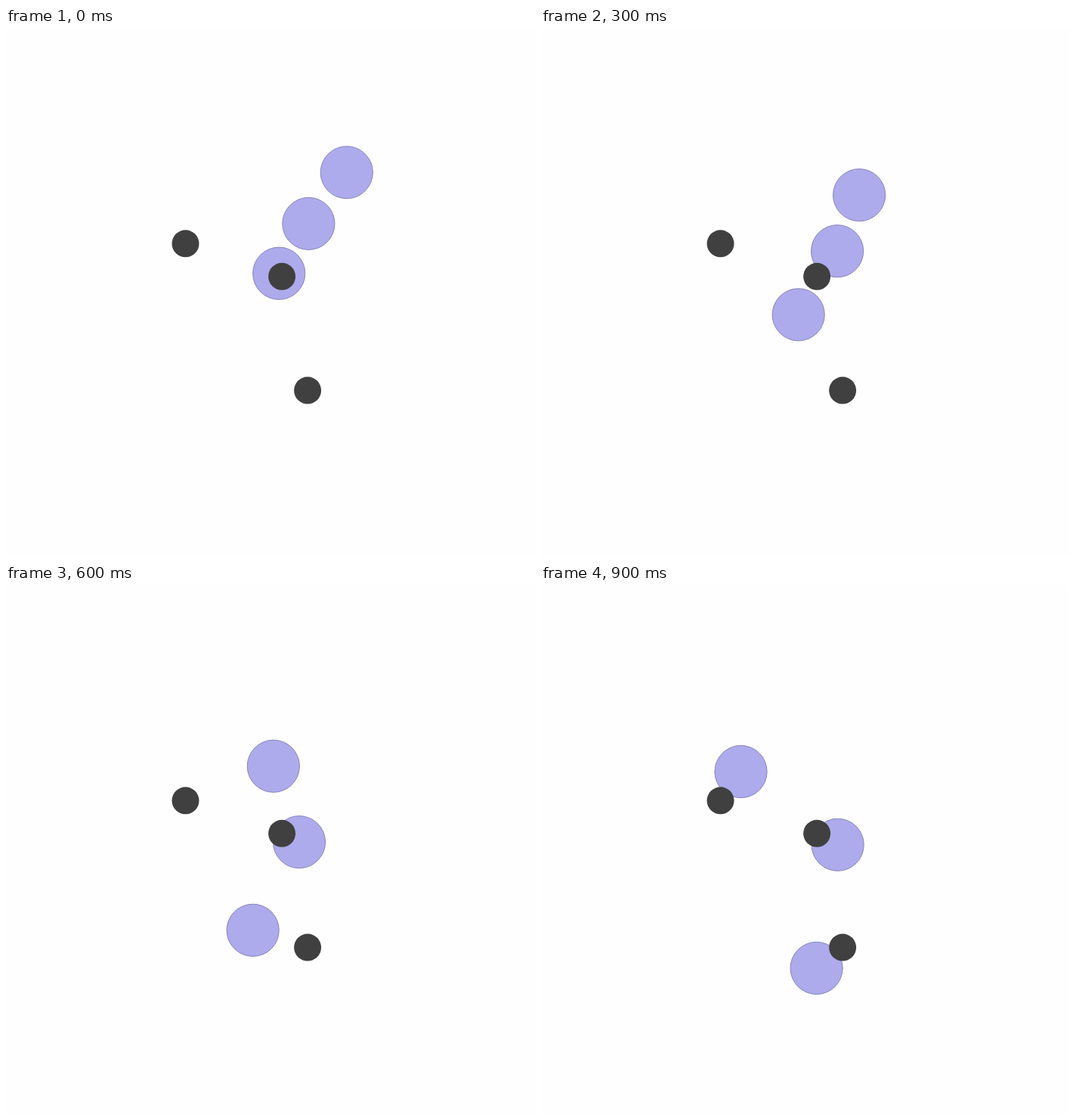
These frames come from a looping animation (700 by 700 pixels, 1 s). An HTML page without scripts:

```html
<!DOCTYPE html>
<html lang="en">
<head>
<meta charset="utf-8">
<title>Bouncing balls</title>
<style>
  @property --t { syntax: "<number>"; inherits: true; initial-value: 0; }

  html, body { margin: 0; width: 100%; height: 100%; overflow: hidden; background: #fefefe; }

  /* --t counts ten held steps per loop */
  svg { display: block; width: 100%; height: 100%; animation: tick 1s steps(10) infinite; }
  @keyframes tick { from { --t: 0; } to { --t: 10; } }

  .peg { fill: #404040; }
  .ball {
    fill: #adabeb;
    stroke: #8785bc;
    translate: calc(var(--x) * 1px) calc(var(--y) * 1px);
  }

  /* Sweeps left while its fall slows */
  .sweep {
    --x: (450.8 - var(--t) * (3.207 + var(--t) * (2.157 + var(--t) * (.0483 - var(--t) * .008))));
    --y: (191.1 + var(--t) * (9.554 + var(--t) * (.773 - var(--t) * (.2532 - var(--t) * .014))));
  }

  /* Falls until step 4, then hops beside the peg in widening arcs */
  .hop {
    --fall: min(var(--t), 4);
    --u: max(0, var(--t) - 4);
    --arc: sin(pi * pow(var(--u) / 2, .7));
    --x: (400.4 - var(--fall) * (1.05 + var(--fall) * .575)
      + var(--u) * .5 + (5 + var(--u)) * max(var(--arc), -1 * var(--arc)));
    --y: (258.9 + var(--t) * (1.4 + var(--t) * (5.527 - var(--t) * (.722 - var(--t) * .023))));
  }

  /* Falls freely, then the lower peg deflects it */
  .drop {
    --hit: max(0, var(--t) - 6.54);
    --x: (361.2 - var(--t) * (5.416 + var(--t) * (.896 - var(--t) * .14)) + var(--hit) * 9.2);
    --y: (324.7 + var(--t) * (14.4 + var(--t) * 1.27) - var(--hit) * 20.4);
  }
</style>
</head>
<body>
<svg viewBox="0 0 700 700">
  <circle class="ball sweep" r="34.6"/>
  <circle class="ball hop" r="34.6"/>
  <circle class="ball drop" r="34.6"/>
  <circle class="peg" cx="237.5" cy="285.3" r="18"/>
  <circle class="peg" cx="365.1" cy="328.8" r="18"/>
  <circle class="peg" cx="399.1" cy="479.6" r="18"/>
</svg>
</body>
</html>
```
